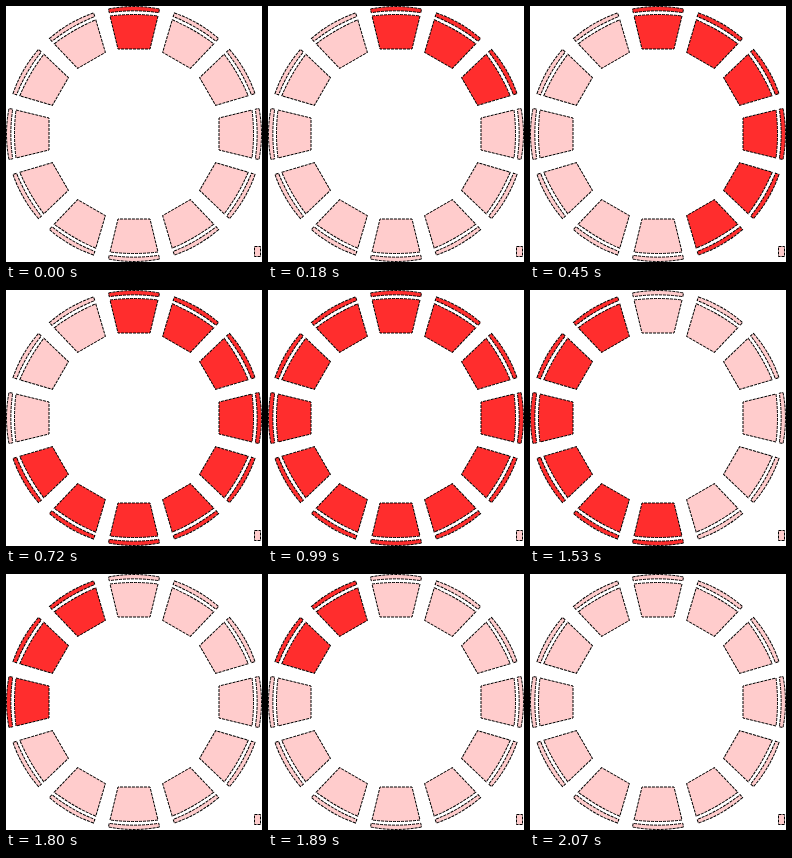
Animation of 256 by 256 pixels, one loop 2.16 s. Source, as an HTML page:

```html
<!DOCTYPE html>
<html lang="en">
<head>
<meta charset="utf-8">
<title>Ring of seats</title>
<style>
  html, body { margin: 0; width: 100%; height: 100%; overflow: hidden; background: #fff; }
  svg { display: block; width: 100vw; height: 100vh; }
  .seat, .spare { fill: #ffcccc; stroke: #000; stroke-width: 1; stroke-dasharray: 3 1; }
  .seat { animation: light 2160ms step-end infinite; }
  @keyframes light {
    0% { fill: #ff2d2d; }
    50%, 100% { fill: #ffcccc; }
  }
</style>
</head>
<body>
<svg viewBox="0 0 256 256">
  <defs>
    <g id="shape">
      <path d="M-24-118Q0-121 24-118L16-85H-16Z"/>
      <path d="M-25.5-125Q0-130 25.5-125L24.8-121.3Q0-125 -24.8-121.3Z"/>
    </g>
  </defs>
  <g id="ring" transform="translate(128 128)"></g>
  <rect class="spare" x="248.5" y="240.5" width="6" height="10"/>
</svg>
<script>
  const COUNT = 12, STEP = 90, LOOP = 2160;
  const ring = document.getElementById('ring');
  for (let i = 0; i < COUNT; i++) {
    const seat = document.createElementNS(ring.namespaceURI, 'use');
    seat.setAttribute('href', '#shape');
    seat.setAttribute('class', 'seat');
    seat.setAttribute('transform', `rotate(${i * 360 / COUNT})`);
    // Negative delays start every seat mid-cycle, one step after its neighbour.
    seat.style.animationDelay = `${i * STEP - LOOP}ms`;
    ring.append(seat);
  }
</script>
</body>
</html>
```
